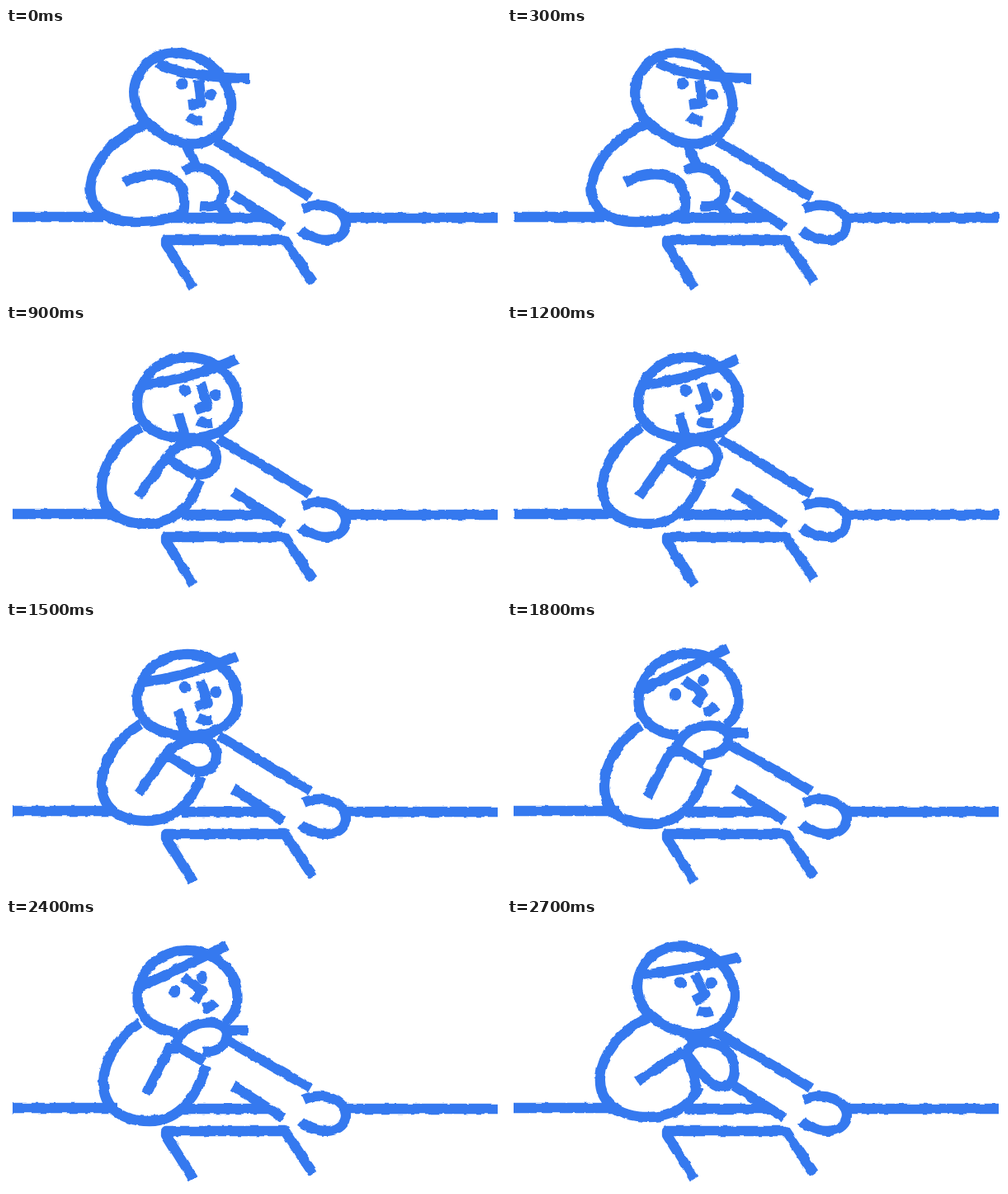
An HTML page that plays this animation: 600x326 px, repeating every 2850 ms.

```html
<!DOCTYPE html>
<html lang="en">
<head>
<meta charset="utf-8">
<title>Leaning on the desk</title>
<style>
  html, body { margin: 0; width: 100%; height: 100%; overflow: hidden; background: #fff; }
  svg { display: block; width: 100vw; height: 100vh; }
</style>
</head>
<body>
<svg viewBox="0 0 600 326">
  <filter id="rough" filterUnits="userSpaceOnUse" x="0" y="0" width="600" height="326" color-interpolation-filters="sRGB">
    <feTurbulence id="noise" type="fractalNoise" baseFrequency="0.09" numOctaves="2"/>
    <feDisplacementMap in="SourceGraphic" scale="4" xChannelSelector="R" yChannelSelector="G"/>
  </filter>
  <g filter="url(#rough)" fill="none" stroke="#3579ef" stroke-width="12.3" stroke-linejoin="round">
    <!-- table, far forearm and fist never move -->
    <path d="M412,230H596 M227,315L194,262V257H338L372,308 M275,202L336,241
             M360,219C385,208 412,220 412,238C412,258 380,265 357,245"/>
    <path id="ink"/>
    <g id="face">
      <g fill="#3579ef" stroke="none">
        <circle cx="-19" r="7.2"/>
        <circle cx="19" r="7"/>
      </g>
      <path d="M-1.5,-11L11.6,14L-2.5,21.5 M2,34Q11,37 20,34"/>
    </g>
  </g>
</svg>
<script>
const STEP = 150, LOOP = 2850, HOLD = 6;
const [ink, face, noise] = ['ink', 'face', 'noise'].map(id => document.getElementById(id));

// face: x, y, angle. body: neck, leftmost x of the back, base, end of the belly.
const poses = [
  { // chin up, arm folded on the desk
    head: { x: 215, y: 84.5, rx: 61, up: 51, down: 51, tilt: 33 },
    face: [231, 74, 21],
    brim: 'M183,42Q215,60 296,61',
    body: { neck: [172, 115], back: 103, base: [156, 235], end: [215, 224] },
    arm: 'M143,187C170,172 225,168 215,224 M219,143L230,166',
    hand: 'M215,173C250,155 280,200 255,214Q248,217 235,216 M257,213L268,227',
    shoulder: [255, 137]
  },
  { // cheek on the hand
    head: { x: 220, y: 95, rx: 61, up: 56, down: 42, tilt: 0 },
    face: [235.5, 82, 9],
    brim: 'M167,73Q225,65 280,41',
    body: { neck: [163, 124], back: 116, base: [171, 241], end: [236, 188] },
    arm: 'M160,208L194,161L229,182',
    hand: 'M194,161C218,133 253,135 255,160C255,175 245,183 229,181 M209,107L217,136',
    shoulder: [258, 138]
  },
  { // chin in the hand, looking up
    head: { x: 220, y: 95, rx: 60.5, up: 57, down: 43, tilt: 0, from: 100, to: 403 },
    face: [221, 79.5, -27],
    brim: 'M164,82L268,32',
    body: { neck: [162, 126], back: 118, base: [174, 245], end: [243, 178] },
    arm: 'M170,212L198,157H212L240,173',
    hand: 'M206,152C215,120 268,118 268,140C268,155 255,161 238,161 M270,135H293',
    shoulder: [268, 147]
  },
  { // on the way back
    head: { x: 217.5, y: 86, rx: 60, up: 51, down: 50, tilt: 25 },
    face: [229, 77.5, 0],
    brim: 'M165,68Q225,60 282,46',
    body: { neck: [171, 119], back: 113, base: [173, 240], end: [233, 203] },
    arm: 'M157,197L214,160 M218,162L230,206 M218,140L232,150',
    hand: 'M217,163C225,140 263,148 273,168C282,190 270,212 250,200Q235,190 217,163Z',
    shoulder: [252, 136]
  }
];

// An egg with a slightly squared lower half.
function egg({ x, y, rx, up, down, tilt, from = 0, to = 360 }) {
  const rad = Math.PI / 180, c = Math.cos(tilt * rad), s = Math.sin(tilt * rad);
  const pts = [], n = 72;
  for (let i = 0; i <= n; i++) {
    const a = (from + (to - from) * i / n) * rad;
    const power = Math.sin(a) > 0 ? 0.9 : 1;
    const bend = v => Math.sign(v) * Math.abs(v) ** power;
    const u = rx * bend(Math.cos(a));
    const v = bend(Math.sin(a)) * (Math.sin(a) > 0 ? down : up);
    pts.push([x + u * c - v * s, y + u * s + v * c]);
  }
  return 'M' + pts.join('L') + (to - from === 360 ? 'Z' : '');
}

// The back bulges out to a given x, then the belly swings up to its end.
function torso({ neck: [nx, ny], back, base: [bx, by], end: [ex, ey] }) {
  const pull = (8 * back - nx - bx) / 6, w = ex - bx;
  return `M${nx},${ny}C${pull + 8},${ny + 33} ${pull - 8},${by} ${bx},${by}`
    + `C${bx + 0.55 * w},${by} ${ex - 0.15 * w},${(by + ey) / 2} ${ex},${ey}`;
}

const desk = x => `M8,229H${x - 38}M${x + 42},230H318`;

let shown = -1;

function draw(t) {
  const step = Math.floor((t % LOOP) / STEP);
  if (step === shown) return;
  shown = step;
  const p = poses[Math.floor(step / HOLD)];
  ink.setAttribute('d', [
    desk(p.body.base[0]), torso(p.body), egg(p.head),
    p.brim, p.arm, p.hand, `M${p.shoulder}L369,205`
  ].join(''));
  const [x, y, angle] = p.face;
  face.setAttribute('transform', `translate(${x} ${y}) rotate(${angle})`);
  noise.setAttribute('seed', 3 + step % 3 * 4);
}

const start = performance.now();
function tick() {
  draw(performance.now() - start);
  requestAnimationFrame(tick);
}
tick();
</script>
</body>
</html>
```
